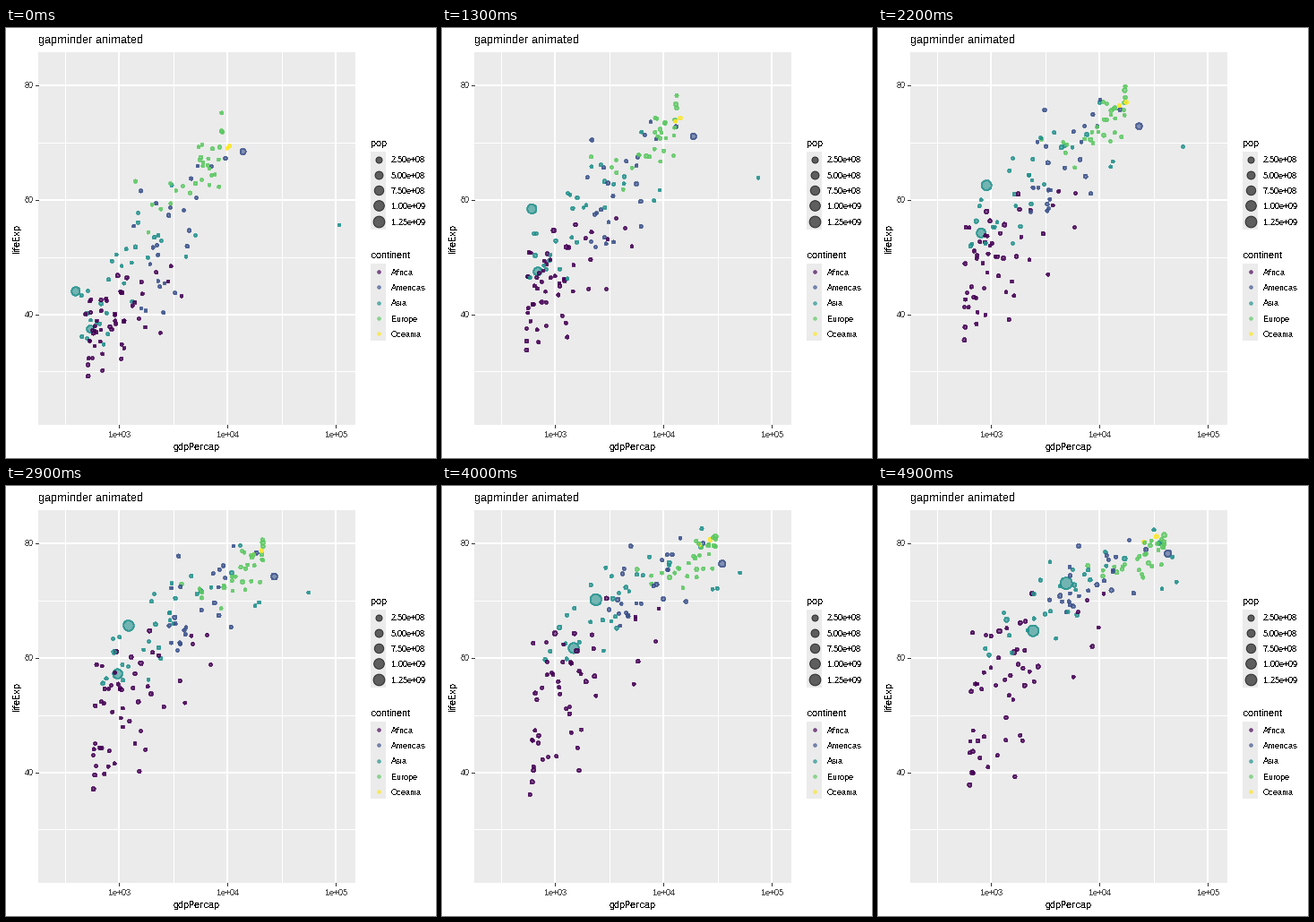
A matplotlib script for the animation above (5000 ms loop, 480 by 480 pixels).

```python
import numpy as np
import matplotlib.pyplot as plt
from matplotlib.animation import FuncAnimation
from matplotlib.colors import to_rgba
from matplotlib.patches import Rectangle

SIZE, DPI = 480, 72  # one point equals one pixel
FRAMES, INTERVAL = 50, 100
LEFT, TOP, RIGHT, BOTTOM = 36, 27, 390, 443
COLORS = {"Africa": "#440154", "Americas": "#3B528B", "Asia": "#21908C",
          "Europe": "#5DC863", "Oceania": "#FDE725"}

plt.rcParams.update({
    "font.family": "Liberation Sans", "text.antialiased": False,
    "text.hinting": "native", "text.hinting_factor": 1,
})

# Every fifth year falls on a whole frame; motion is linear in between.
YEARS = np.arange(1952, 2008, 5)
KEY_FRAMES = np.round(np.linspace(0, FRAMES - 1, len(YEARS)))
PROGRESS = (YEARS - YEARS[0]) / (YEARS[-1] - YEARS[0])

# Dots that stand out: continent, population (millions) at both ends,
# and a few (year, gdp, life) key points.
LONERS = [
    ("Asia", 556, 1319, [(1952, 400, 44), (1962, 488, 44.5), (1967, 613, 58.4),
                         (1992, 1656, 68.7), (2007, 4959, 73)]),
    ("Asia", 372, 1110, [(1952, 547, 37.4), (1977, 813, 54.2),
                         (1992, 1164, 60.2), (2007, 2452, 64.7)]),
    ("Americas", 158, 301, [(1952, 13990, 68.4), (2007, 42952, 78.2)]),
    ("Asia", 0.2, 2.5, [(1952, 108382, 55.6), (1977, 59265, 69.3),
                        (2007, 47307, 77.6)]),
    ("Africa", 3, 9, [(1952, 493, 40), (1987, 848, 44), (1992, 737, 23.6),
                      (1997, 590, 36.1), (2007, 863, 46.2)]),
]

# Crowds: (start, end) of the mean and spread of log10 gdp and of life.
CROWDS = {
    "Africa": dict(count=51, gdp=(2.98, 3.2), gdp_sd=(0.27, 0.4),
                   life=(39, 55), life_sd=(5, 9.5), link=0.45, skew=0.3),
    "Americas": dict(count=24, gdp=(3.48, 3.93), gdp_sd=(0.25, 0.27),
                     life=(53.5, 73.5), life_sd=(9, 4), link=0.6, skew=0),
    "Asia": dict(count=30, gdp=(3.05, 3.72), gdp_sd=(0.33, 0.54),
                 life=(46.5, 70.8), life_sd=(8.5, 6.5), link=0.75, skew=0),
    "Europe": dict(count=30, gdp=(3.7, 4.38), gdp_sd=(0.26, 0.23),
                   life=(65, 77.6), life_sd=(5.5, 2.8), link=0.8, skew=-0.3),
    "Oceania": dict(count=2, gdp=(4.01, 4.47), gdp_sd=(0.01, 0.06),
                    life=(69.2, 80.7), life_sd=(0.2, 0.5), link=1, skew=0),
}


def mix(ends, t):
    return ends[0] + (ends[1] - ends[0]) * t


def dot_size(millions):
    return 1 + 5 * np.sqrt(np.minimum(millions, 1319) / 1319)


def dot_area(size):
    diameter = 0.75 * (size * 72.27 / 25.4 + 0.94)
    return (diameter - 0.4) ** 2


def px_x(log_gdp):
    return 126 + 121 * (log_gdp - 3)


def px_y(life):
    return 319.5 - 6.39 * (life - 40)


def standard(z):
    return (z - z.mean()) / z.std()


def soft_limit(z, limit=2.4):
    return limit * np.tanh(z / limit)


def crowd(rng, count, gdp, gdp_sd, life, life_sd, link, skew):
    """Seeded scatter around an easing trend, with a slow drift and small kinks."""
    start, drift = rng.standard_normal((2, 2, count))
    track = []
    for t in PROGRESS:
        jitter = 0.08 * rng.standard_normal((2, count))
        u, v = start + 0.6 * t * drift + jitter
        u, v = standard(u), standard(v)
        height = soft_limit(link * u + np.sqrt(1 - link ** 2) * v)
        across = soft_limit(standard(u + skew * u ** 2))
        rise = np.sin(t * np.pi / 2)
        track.append((mix(gdp, t) + mix(gdp_sd, t) * across,
                      mix(life, rise) + mix(life_sd, t) * height))
    pop = 4 * np.exp(1.1 * soft_limit(rng.standard_normal(count)))
    return pop, 2.2 * pop, np.array(track).transpose(2, 1, 0)


def loner(pop0, pop1, points):
    year, gdp, life = np.array(points).T
    return pop0, pop1, np.array([np.interp(YEARS, year, np.log10(gdp)),
                                 np.interp(YEARS, year, life)])


rng = np.random.default_rng(7)
dots = [(name, *loner(*rest)) for name, *rest in LONERS]
for name, rule in CROWDS.items():
    dots += [(name, *dot) for dot in zip(*crowd(rng, **rule))]
dots.sort(key=lambda dot: -dot[1])

names, pop0, pop1, tracks = zip(*dots)
size0, size1 = dot_size(np.array(pop0)), dot_size(np.array(pop1))
tracks = np.array(tracks)  # dot, axis, key year

fig = plt.figure(figsize=(SIZE / DPI, SIZE / DPI), dpi=DPI, facecolor="white")
ax = fig.add_axes([0, 0, 1, 1])
ax.set(xlim=(0, SIZE), ylim=(SIZE, 0))
ax.axis("off")


def box(x0, y0, x1, y1):
    ax.add_patch(Rectangle((x0, y0), x1 - x0, y1 - y0, fc="#EBEBEB", lw=0, zorder=0))


def line(xs, ys, color="white", width=1):
    ax.plot(xs, ys, color=color, lw=width, solid_capstyle="butt",
            antialiased=False, zorder=1)


def label(x, y, text, size=9, color="black", **kw):
    ax.text(x, y, text, fontsize=size, color=color, **kw)


def points(xs, ys, sizes, colors):
    return ax.scatter(xs, ys, s=dot_area(sizes), linewidths=0.9, zorder=3,
                      facecolors=[to_rgba(c, 0.6) for c in colors],
                      edgecolors=[to_rgba(c, 0.75) for c in colors],
                      antialiaseds=False)


box(LEFT, TOP, RIGHT, BOTTOM)
for log_gdp in (2.5, 3.5, 4.5):
    line([px_x(log_gdp)] * 2, [TOP, BOTTOM])
for life in (30, 50, 70):
    line([LEFT, RIGHT], [px_y(life)] * 2)
for power in (3, 4, 5):
    x = px_x(power)
    line([x, x], [TOP, BOTTOM], width=2)
    line([x, x], [BOTTOM, BOTTOM + 3], "#333333")
    label(x + 0.5, 457, f"1e+0{power}", color="#4D4D4D", ha="center")
for life in (40, 60, 80):
    y = px_y(life)
    line([LEFT, RIGHT], [y, y], width=2)
    line([LEFT - 3, LEFT], [y, y], "#333333")
    label(31, y + 3.5, str(life), color="#4D4D4D", ha="right")

label(36, 17, "gapminder animated", 13)
label(213, 471, "gdpPercap", 11, ha="center")
label(12, 235, "lifeExp", 11, rotation=90, ha="center", va="center")

KEY_X, KEY_STEP = 415.6, 17.28
label(407, 132, "pop", 11)
box(407, 138, 424, 225)
for i in range(5):
    y = 146.6 + KEY_STEP * i
    pop = 250 * (i + 1)
    points([KEY_X], [y], dot_size(pop), ["black"])
    label(430, y + 3.8, f"{pop * 1e6:.2e}")

label(407, 257, "continent", 11)
box(407, 263, 424, 349)
for i, (name, color) in enumerate(COLORS.items()):
    y = 272 + KEY_STEP * i
    points([KEY_X], [y], 1.5, [color])
    label(430, y + 3.8, name)

cloud = points(np.zeros(len(dots)), np.zeros(len(dots)), size0,
               [COLORS[name] for name in names])


def update(frame):
    k = min(np.searchsorted(KEY_FRAMES, frame, side="right") - 1, len(YEARS) - 2)
    t = (frame - KEY_FRAMES[k]) / (KEY_FRAMES[k + 1] - KEY_FRAMES[k])
    log_gdp, life = mix((tracks[:, :, k], tracks[:, :, k + 1]), t).T
    cloud.set_offsets(np.column_stack([px_x(log_gdp), px_y(life)]))
    cloud.set_sizes(dot_area(mix((size0, size1), frame / (FRAMES - 1))))
    return (cloud,)


anim = FuncAnimation(fig, update, frames=FRAMES, interval=INTERVAL,
                     repeat=True, repeat_delay=0)
plt.show()
```
